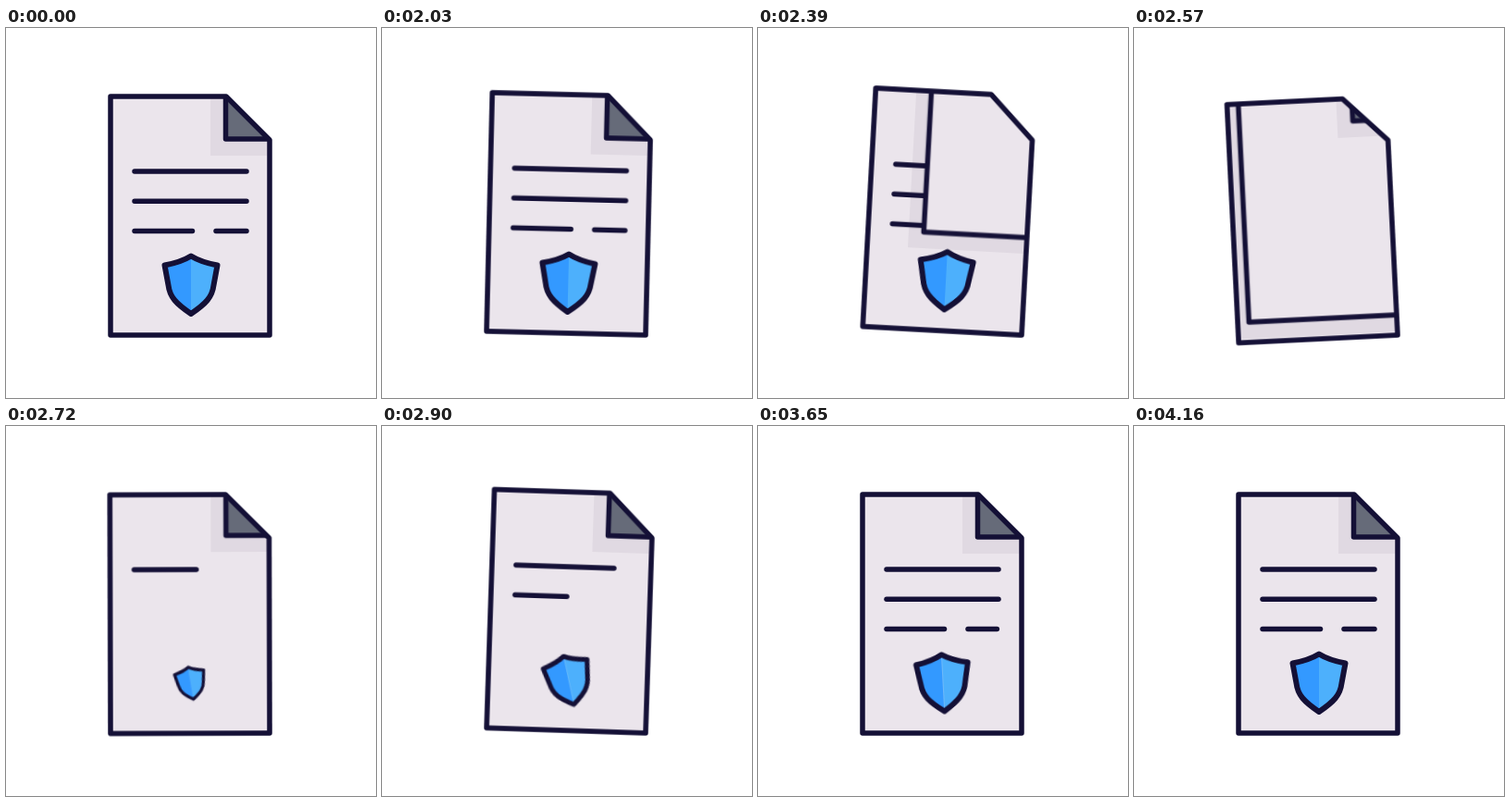
Recreate the animation shown at these times as an HTML page without scripts. Size 400x400 px, loop 4.43 s.

```html
<!DOCTYPE html>
<html lang="en">
<head>
<meta charset="utf-8">
<title>Protected document</title>
<style>
  html, body { margin: 0; width: 100%; height: 100%; overflow: hidden; background: #fff; }
  svg { display: block; width: 100vw; height: 100vh; }

  .ink { stroke: #141036; stroke-width: 5.5; stroke-linecap: round; stroke-linejoin: round; }
  .paper { fill: #ebe5ec; }
  .shade { fill: #141036; fill-opacity: .05; }
  .flap { fill: #666b79; }

  .doc, .old, .new, .peel, .peel .flap, .curl, .badge, .row {
    animation: 4430ms linear infinite;
  }
  .doc { transform-origin: 285px 332px; animation-name: sway; }
  .old { animation-name: leave; }
  .new { animation-name: arrive; }
  .peel { animation-name: peel; }
  .peel .flap { animation-name: pale; }
  .curl { animation-name: curl; }
  .badge { transform-origin: 200px 278px; animation-name: badge; }
  .row {
    opacity: 0;
    stroke-dasharray: 1 2;
    animation-name: grow;
    animation-delay: var(--at);
  }

  @keyframes sway {
    0%, 45.81% { transform: rotate(0deg); }
    45.82% { transform: rotate(1.33deg); animation-timing-function: cubic-bezier(.3, .6, .6, 1); }
    51.47% { transform: rotate(6.7deg); animation-timing-function: cubic-bezier(.37, 0, .63, 1); }
    57.45% { transform: rotate(-2.9deg); animation-timing-function: cubic-bezier(.37, 0, .63, 1); }
    64.79% { transform: rotate(1.95deg); animation-timing-function: cubic-bezier(.37, 0, .63, 1); }
    70.2%, 100% { transform: rotate(0deg); }
  }
  @keyframes leave {
    0%, 59.7% { visibility: visible; }
    59.71%, 100% { visibility: hidden; }
  }
  @keyframes arrive {
    0%, 55.74% { visibility: hidden; }
    55.75%, 100% { visibility: visible; }
  }
  @keyframes peel {
    0%, 45.82% { transform: translate(0, 0); animation-timing-function: cubic-bezier(.5, 0, .7, .55); }
    53.95% { transform: translate(-64px, 106px); }
    58.01% { transform: translate(-112px, 189.5px); }
    59.65%, 100% { transform: translate(-133px, 226px); }
  }
  @keyframes pale {
    0%, 46.5% { fill: #666b79; }
    51%, 100% { fill: #ebe5ec; }
  }
  @keyframes curl {
    0%, 55.76% { transform: translate(32px, -66px); animation-timing-function: cubic-bezier(.215, .61, .355, 1); }
    63.43%, 100% { transform: translate(0, 0); }
  }
  @keyframes badge {
    0%, 58.7% { transform: rotate(0deg) scale(0); animation-timing-function: cubic-bezier(.3, .5, .5, 1); }
    65.46% { transform: rotate(-14deg) scale(.85); animation-timing-function: ease-in-out; }
    72.91% { transform: rotate(17deg) scale(.93); animation-timing-function: ease-in-out; }
    79.7% { transform: rotate(-5deg) scale(.97); animation-timing-function: ease-in-out; }
    86%, 100% { transform: rotate(0deg) scale(1); }
  }
  /* rows vanish again while their group is hidden */
  @keyframes grow {
    0% { opacity: 1; stroke-dashoffset: 1; animation-timing-function: cubic-bezier(.215, .61, .355, 1); }
    14.67%, 50% { opacity: 1; stroke-dashoffset: 0; }
    50.01%, 100% { opacity: 0; stroke-dashoffset: 0; }
  }
</style>
</head>
<body>
<svg viewBox="0 0 400 400">
  <defs>
    <path id="page" d="M113 74H238L285 121V332H113Z"/>
    <clipPath id="inside"><use href="#page"/></clipPath>
    <g id="shield">
      <path fill="#3399ff" d="M200 246.5C192 251.5 182 254.5 171.5 256.5L175.5 278C177 291 184 298 200 309Z"/>
      <path fill="#4db0fc" d="M200 246.5C208 251.5 218 254.5 228.5 256.5L224.5 278C223 291 216 298 200 309Z"/>
      <path class="ink" fill="none" style="stroke-width:6" d="M200 246.5C208 251.5 218 254.5 228.5 256.5L224.5 278C223 291 216 298 200 309C184 298 177 291 175.5 278L171.5 256.5C182 254.5 192 251.5 200 246.5Z"/>
    </g>
  </defs>

  <g class="doc">
    <use href="#page" class="paper"/>
    <g clip-path="url(#inside)">
      <g class="old">
        <path class="ink" d="M139 155H260M139 187.3H260M139 219.5H201.5M227 219.5H260"/>
        <use href="#shield"/>
        <g class="peel">
          <path class="shade" d="M221 -300V138H600V-300Z"/>
          <path class="flap ink" d="M237.5 -300V120H600V-300Z"/>
        </g>
      </g>
      <g class="new">
        <g class="curl">
          <path class="shade" d="M221 -300V138H600V-300Z"/>
          <path class="flap ink" d="M237.5 -300V120H600V-300Z"/>
        </g>
        <path class="row ink" pathLength="1" style="--at:2575ms" d="M139 155H260"/>
        <path class="row ink" pathLength="1" style="--at:2785ms" d="M139 187.3H260"/>
        <path class="row ink" pathLength="1" style="--at:2980ms" d="M139 219.5H201.5"/>
        <path class="row ink" pathLength="1" style="--at:3225ms" d="M227 219.5H260"/>
        <g class="badge"><use href="#shield"/></g>
      </g>
    </g>
    <use href="#page" class="ink" fill="none"/>
  </g>
</svg>
</body>
</html>
```
